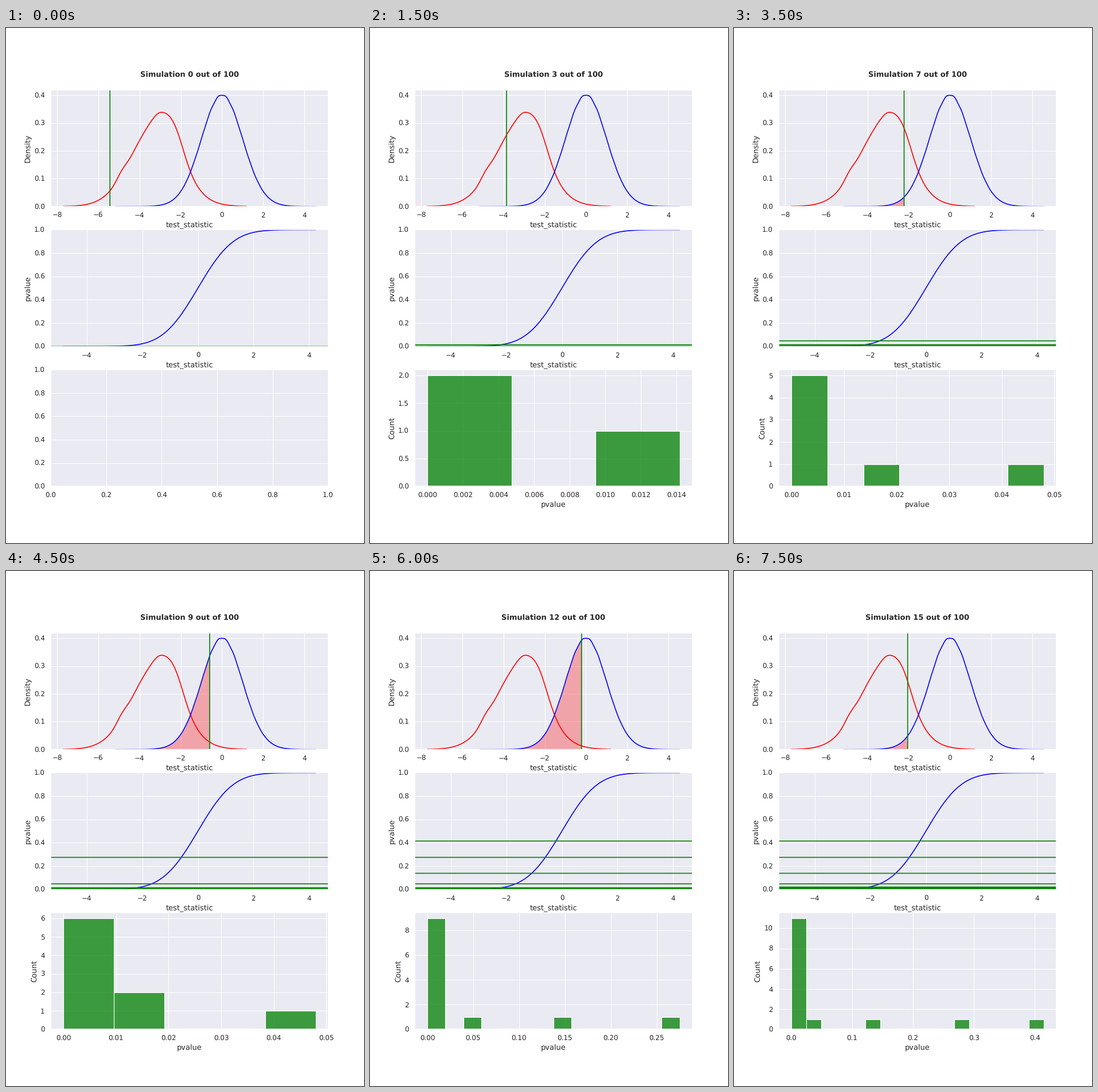
A matplotlib script for the animation above (8 s loop, 624 px wide and 897 px high).

```python
import math

import matplotlib.pyplot as plt
import numpy as np
from matplotlib.animation import FuncAnimation

DARK, PANEL = "#262626", "#EAEAF2"
STEP_MS, TOTAL = 500, 100

plt.rcParams.update({
    "font.family": "DejaVu Sans", "text.hinting": "none",
    "text.color": DARK, "axes.labelcolor": DARK,
    "xtick.color": DARK, "ytick.color": DARK,
    "axes.facecolor": PANEL, "axes.edgecolor": "white", "axes.linewidth": 1.5,
    "axes.grid": True, "axes.axisbelow": True, "axes.labelsize": 12,
    "grid.color": "white", "grid.linewidth": 1, "grid.linestyle": "-",
    "xtick.labelsize": 11, "ytick.labelsize": 11,
    "xtick.major.size": 6, "ytick.major.size": 6,
    "xtick.bottom": False, "ytick.left": False,
    "lines.linewidth": 1.5, "lines.solid_capstyle": "round",
})

# Statistic observed in each simulation.
STATS = [-5.435, -4.25, -2.192, -3.855, -3.075, -3.79, -1.665, -2.227,
         -4.0, -0.598, -3.35, -1.089, -0.216, -2.51, -3.2, -2.054]


def norm_cdf(x):
    return 0.5 * (1 + math.erf(x / math.sqrt(2)))


def bump(x, center, width):
    return np.exp(-((x - center) / width) ** 2)


def null_density(x):
    """Standard normal with the slight ripple of a kernel estimate."""
    bell = np.exp(-x * x / 2)
    return bell * (0.4013 + 0.0015 * np.cos(16 * (x - 0.2)))


def alt_density(x):
    """Skewed bell whose spread varies with the distance from its mode."""
    mode = -2.94
    d = np.abs(x - mode)
    left = 1.31 - 0.3 * bump(d, 0, 0.8) + 0.08 * bump(d, 1.95, 0.35)
    right = 0.86 + 0.075 * d + 0.52 * bump(d, 0, 0.85)
    spread = np.where(x < mode, left, right)
    return 0.339 * np.exp(-(d / spread) ** 2 / 2)


PVALUES = [0.0] + [norm_cdf(s) for s in STATS[1:]]
ALT_X = np.linspace(-7.7, 1.2, 300)
NULL_X = np.linspace(-5.15, 4.54, 300)
CDF_X = np.linspace(-4.846, 4.238, 400)
CDF_Y = [norm_cdf(x) for x in CDF_X]
MARKER = dict(color="green", snap=False)

fig, (ax_density, ax_cdf, ax_hist) = plt.subplots(3, 1, figsize=(8, 11.5), dpi=78)


def draw_density(n):
    ax, stat = ax_density, STATS[n]
    ax.plot(ALT_X, alt_density(ALT_X), color="red")
    ax.plot(NULL_X, null_density(NULL_X), color="blue")
    tail = np.linspace(min(NULL_X[0], stat), stat, 200)
    ax.fill_between(tail, null_density(tail), color="red", alpha=0.3, linewidth=0)
    ax.axvline(stat, **MARKER)
    ax.set(xlim=(-8.308, 5.152), ylim=(0, 0.4198),
           xlabel="test_statistic", ylabel="Density")
    ax.set_title(f"Simulation {n} out of {TOTAL}", fontsize=12,
                 fontweight="bold", pad=20)


def draw_cdf(n):
    ax_cdf.plot(CDF_X, CDF_Y, color="blue")
    for p in PVALUES[:n + 1]:
        ax_cdf.axhline(p, **MARKER)
    ax_cdf.set(xlim=(-5.30, 4.692), ylim=(0, 1),
               xlabel="test_statistic", ylabel="pvalue")


def draw_hist(n):
    if n == 0:
        return
    counts, edges = np.histogram(PVALUES[:n], bins="auto")
    ax_hist.bar(edges[:-1], counts, np.diff(edges), align="edge",
                facecolor=(0, 0.5, 0, 0.75), edgecolor="white", linewidth=1)
    ax_hist.set(xlabel="pvalue", ylabel="Count")


def update(n):
    for ax in (ax_density, ax_cdf, ax_hist):
        ax.clear()
    draw_density(n)
    draw_cdf(n)
    draw_hist(n)
    return []


anim = FuncAnimation(fig, update, frames=len(STATS), interval=STEP_MS,
                     repeat=True, repeat_delay=0, blit=False)
plt.show()
```
